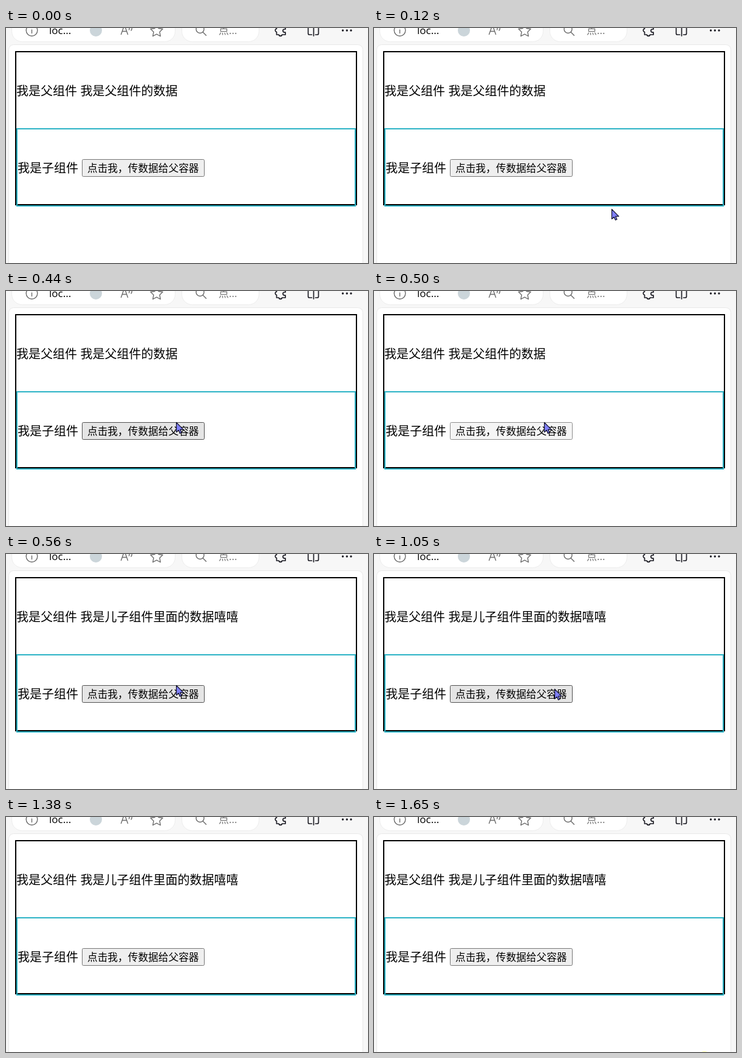
These frames come from a looping animation (596 by 387 pixels, 1.7 s). An HTML page:

```html
<!DOCTYPE html>
<html lang="zh-CN">
<head>
<meta charset="utf-8">
<title>父子组件</title>
<style>
  html, body { margin: 0; width: 100%; height: 100%; overflow: hidden; background: #f7f7f7; }
  svg { display: block; width: 596px; height: 387px; }
  text { font: 20px "Noto Sans CJK SC", "Noto Sans CJK", sans-serif; fill: #000; }
  .bar { font: 17px "Open Sans", "Noto Sans CJK SC", "Noto Sans CJK", sans-serif; }
  .line { fill: none; stroke-width: 1.4; stroke-linecap: round; stroke-linejoin: round; }
  .grey { stroke: #6b6b6b; }
  .dark { stroke: #1d1d25; stroke-width: 1.7; }
</style>
</head>
<body>
<svg viewBox="0 0 596 387">
  <rect width="596" height="387" fill="#f7f7f7"/>

  <!-- toolbar -->
  <g fill="#fff" stroke="#ededed">
    <rect x="9.5" y="-30" width="269" height="52.5" rx="17"/>
    <rect x="289.5" y="-30" width="127" height="52.5" rx="17"/>
  </g>
  <g class="line grey">
    <circle cx="42.5" cy="4" r="9.3"/>
    <path d="M42.5 3V8.5M42.5 -.5V-.4"/>
    <path d="M189.500 10.500L195 -5L200.500 10.500M191.300 5.500H198.700M201.500 -3Q204 0 202.500 3M205 -5Q209 0 206 4"/>
    <path d="M248 -6L251 .5L258 1.500L253 6.400L254.200 13.500L248 10.200L241.800 13.500L243 6.400L238 1.500L245 .5Z"/>
    <circle cx="319.500" cy="2" r="6.500"/>
    <path d="M324.300 7L329.500 12.300"/>
  </g>
  <circle cx="148" cy="4" r="10" fill="#cbd5da"/>
  <text class="bar" x="71" y="10">loc...</text>
  <text class="bar" x="350" y="10" style="fill:#757575">点...</text>
  <g class="line dark">
    <path d="M443 -4H460V2H458.500A2.600 2.600 0 0 0 458.500 7.200H460V11H454.500A2.700 2.700 0 0 1 449.200 11H445.500V6.500A2.700 2.700 0 0 1 445.500 1.200V-4"/>
    <path d="M503.500 11H499.500Q497.500 11 497.500 9V-4M506.500 -4V13M509.500 11H512.500Q514.500 11 514.500 9V-4"/>
  </g>
  <g fill="#1d1d25">
    <circle cx="554.500" cy="4" r="1.700"/>
    <circle cx="561.300" cy="4" r="1.700"/>
    <circle cx="568" cy="4" r="1.700"/>
  </g>

  <!-- page -->
  <rect x="4.500" y="27.500" width="583" height="380" rx="8" fill="#fff" stroke="#e9e9e9"/>
  <rect x="16" y="39" width="561" height="252" fill="none" stroke="#000" stroke-width="2"/>
  <rect x="18" y="166" width="557" height="127" fill="none" stroke="#2bb3c6" stroke-width="2"/>
  <text x="17" y="110.500">我是父组件</text>
  <text id="message" x="122.500" y="110.500"></text>
  <text x="19" y="237.500">我是子组件</text>
  <rect id="button" x="125.500" y="216.500" width="201" height="28" rx="2"/>
  <text x="134" y="237.300" style="font-size:16.700px">点击我，传数据给父容器</text>

  <circle id="glow" cx="544" cy="398" r="12" fill="#ffff9c"/>
  <path id="cursor" d="M.5 .5V16.500L4.200 13.200L6.500 18.300L9 17.200L6.800 12.200H12Z"
        fill="#8080f8" stroke="#10102a" stroke-width="1.200" stroke-linejoin="round"/>
</svg>
<script>
  const LOOP = 1700;
  const PRESS = 500, RELEASE = 560, GLOW = 1650;

  // The pointer jumps between sampled positions: [time, x, y]; no position means hidden.
  const pointer = [
    [0], [60, 512, 371], [120, 391, 298], [180, 312, 236], [230, 285, 218],
    [320, 283, 217], [380, 281, 216], [440, 280, 216],
    [1050, 297, 222], [1120, 350, 256], [1190, 437, 308],
    [1260, 501, 346], [1330, 514, 358], [1380]
  ];
  const buttonStyles = {
    idle: ["#efefef", "#767676"],
    hover: ["#e5e5e5", "#4f4f4f"],
    active: ["#f5f5f5", "#8d8d8d"]
  };

  const byId = id => document.getElementById(id);
  const message = byId("message"), button = byId("button");
  const cursor = byId("cursor"), glow = byId("glow");
  const show = (node, on) => node.setAttribute("visibility", on ? "visible" : "hidden");
  const overButton = (x, y) => x >= 125 && x <= 327 && y >= 216 && y <= 245;

  function render(t) {
    const [, x, y] = pointer.filter(([start]) => start <= t).pop();
    const visible = x !== undefined;
    show(cursor, visible);
    if (visible) cursor.setAttribute("transform", `translate(${x} ${y})`);

    const pressed = t >= PRESS && t < RELEASE;
    const state = pressed ? "active" : overButton(x, y) ? "hover" : "idle";
    const [fill, stroke] = buttonStyles[state];
    button.setAttribute("fill", fill);
    button.setAttribute("stroke", stroke);

    message.textContent = t < RELEASE ? "我是父组件的数据" : "我是儿子组件里面的数据嘻嘻";
    show(glow, t >= GLOW);
  }

  const startTime = performance.now();
  function tick() {
    render((performance.now() - startTime) % LOOP);
    requestAnimationFrame(tick);
  }
  tick();
</script>
</body>
</html>
```
